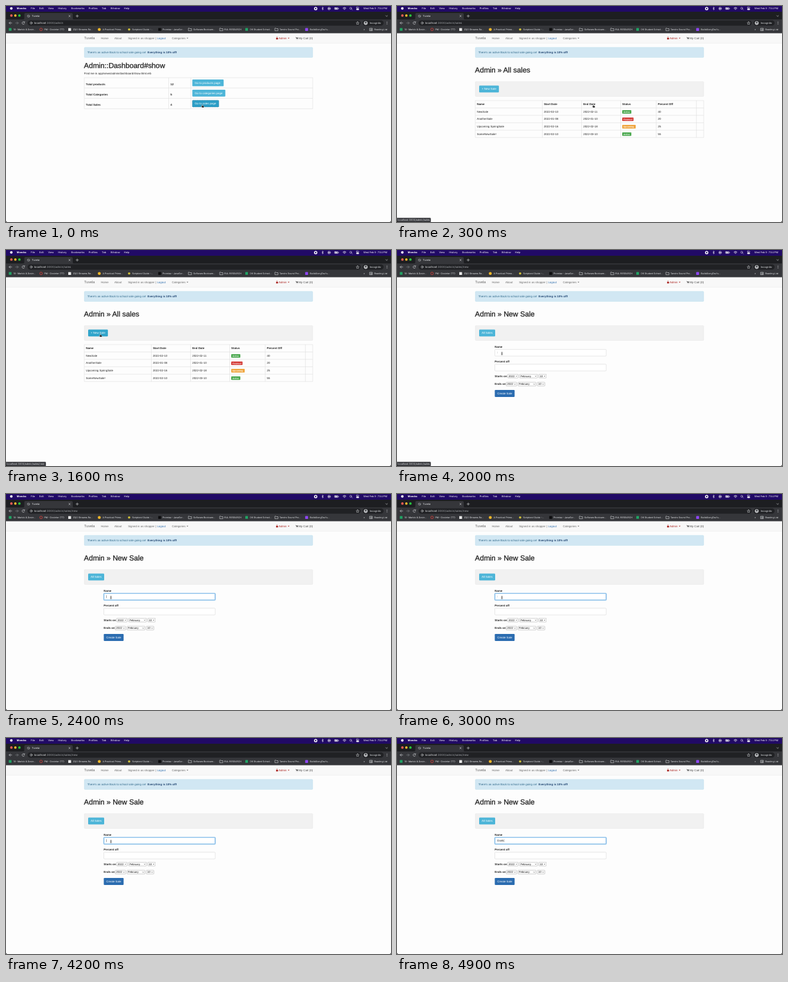
An HTML page for the animation above (5 s loop, 600 by 338 pixels).

```html
<!DOCTYPE html>
<html lang="en">
<head>
<meta charset="utf-8">
<title>Admin sales</title>
<style>
html, body { margin: 0; width: 100%; height: 100%; overflow: hidden; background: #fdfdfd; }
svg { display: block; width: 600px; height: 338px; }
text { text-rendering: geometricPrecision; white-space: pre; }
.ui { font-family: Inter, Roboto, sans-serif; fill: #e8eaed; }
.menu { font-size: 3.9px; fill: #fff; }
.marks { font-size: 3.55px; }
.url { font-size: 4.4px; }
.status text { font-size: 3.8px; }
.dim { fill: #a4a7ac; }
.page { font: 4.4px "Liberation Sans", Arial, sans-serif; fill: #222; }
.b { font-weight: 700; }
.nav { fill: #666; }
.brand { font-size: 5.62px; }
h1, .title { font-size: 11.3px; fill: #222; stroke: #222; stroke-width: .28px; }
.white { fill: #fff; }
.btn { fill: #4db5d8; }
.grid { fill: none; stroke: #d8d8d8; stroke-width: .5px; }
.well { fill: #f1f1f1; stroke: #e0e0e0; stroke-width: .4px; }
.field { fill: #fff; stroke: #c6c6c6; stroke-width: .4px; }
.badge { font-size: 3.28px; font-weight: 700; fill: #fff; }
.line { fill: none; stroke: #dcdee1; stroke-width: .6px; stroke-linecap: round; stroke-linejoin: round; }

.a { animation: 5s step-end infinite; }
.dash { animation-name: dash; }
.list { animation-name: list; }
.form { animation-name: form; }
.link { animation-name: link; }
.link-new { animation-name: link-new; }
.hover { animation-name: hover; }
.hand { animation-name: hand; }
.arrow { animation-name: arrow; }
.beam { animation-name: beam; }
.type { animation-name: type; }
.blink { animation-name: blink; }
.ring { animation-name: ring; animation-timing-function: linear; }
.move { animation-name: move; animation-timing-function: ease-in-out; }

@keyframes dash { 0% { opacity: 1 } 4%, 100% { opacity: 0 } }
@keyframes list { 0% { opacity: 0 } 4% { opacity: 1 } 34%, 100% { opacity: 0 } }
@keyframes form { 0% { opacity: 0 } 34%, 100% { opacity: 1 } }
@keyframes link { 0% { opacity: 0 } 2% { opacity: 1 } 13% { opacity: 0 } 34% { opacity: 1 } 42%, 100% { opacity: 0 } }
@keyframes link-new { 0% { opacity: 0 } 27% { opacity: 1 } 34%, 100% { opacity: 0 } }
@keyframes hover { 0% { fill: #4db5d8 } 26% { fill: #31a5cb } 34%, 100% { fill: #4db5d8 } }
@keyframes hand { 0% { opacity: 1 } 13% { opacity: 0 } 26% { opacity: 1 } 35%, 100% { opacity: 0 } }
@keyframes arrow { 0% { opacity: 0 } 13% { opacity: 1 } 26% { opacity: 0 } 35% { opacity: 1 } 39%, 100% { opacity: 0 } }
@keyframes beam { 0% { opacity: 0 } 39% { opacity: 1 } 86%, 100% { opacity: 0 } }
@keyframes blink { 0% { opacity: 0 } 44% { opacity: 1 } 54% { opacity: 0 } 64% { opacity: 1 } 74% { opacity: 0 } 84%, 100% { opacity: 1 } }
@keyframes ring { 0%, 44% { opacity: 0 } 46%, 100% { opacity: 1 } }
@keyframes type {
  0% { transform: none }
  86% { transform: translateX(3.18px) }
  88% { transform: translateX(5.62px) }
  92% { transform: translateX(7.09px) }
  94% { transform: translateX(8.07px) }
  96%, 100% { transform: translateX(10.27px) }
}
@keyframes move {
  0%, 12% { transform: translate(306px, 154px) }
  22%, 24% { transform: translate(151px, 135px) }
  26%, 34% { transform: translate(147px, 131px) }
  39.5%, 100% { transform: translate(163.5px, 162px) }
}
</style>
</head>
<body>
<svg viewBox="0 0 600 338">
  <defs>
    <path id="folder" d="M0 -1.8h1.7l.7 .7h2.6v3.2h-5z" fill="none" stroke="#d5d7da" stroke-width=".6"/>
    <g id="date">
      <g fill="#fff" stroke="#777" stroke-width=".35">
        <rect x="172.5" y="194.4" width="16.5" height="5.8" rx=".8"/>
        <rect x="191" y="194.4" width="28" height="5.8" rx=".8"/>
        <rect x="221" y="194.4" width="11.8" height="5.8" rx=".8"/>
      </g>
      <g font-size="4.16" fill="#111">
        <text x="174" y="198.8">2022</text>
        <text x="192.4" y="198.8">February</text>
        <text x="222.5" y="198.8">10</text>
      </g>
      <path d="M185.1 196.8l1.1 1.1 1.1-1.1M215.1 196.8l1.1 1.1 1.1-1.1M228.9 196.8l1.1 1.1 1.1-1.1" fill="none" stroke="#222" stroke-width=".55"/>
    </g>
  </defs>

  <rect width="600" height="338" fill="#fdfdfd"/>

  <!-- Menu bar -->
  <rect width="600" height="9" fill="#210a66"/>
  <circle cx="8.3" cy="3.8" r="2" fill="#fff"/>
  <g class="ui menu">
    <text x="16.8" y="5.2" class="b">Mondra</text>
    <text x="38.5" y="5.2">File</text>
    <text x="51.8" y="5.2">Edit</text>
    <text x="65.4" y="5.2">View</text>
    <text x="81.3" y="5.2">History</text>
    <text x="101.6" y="5.2">Bookmarks</text>
    <text x="128.8" y="5.2">Profiles</text>
    <text x="149.3" y="5.2">Tab</text>
    <text x="162.8" y="5.2">Window</text>
    <text x="183.8" y="5.2">Help</text>
    <text x="594" y="5.2" text-anchor="end">Wed Feb 9  7:54 PM</text>
  </g>
  <circle cx="482.6" cy="4" r="2.6" fill="#fff"/>
  <rect x="481.6" y="3" width="2" height="2" fill="#210a66"/>
  <g class="line" style="stroke:#fff;stroke-width:.5px">
    <path d="M492.3 2.8l2.4 2.2-1.2 1.2v-4.6l1.2 1.2-2.4 2.2"/>
    <circle cx="503.6" cy="4" r="2.1"/><path d="M503 3l1.6 1-1.6 1z" fill="#fff"/>
    <rect x="512" y="2.5" width="5.6" height="3" rx=".8"/><path d="M513 4h3.2" stroke-width="1.6"/><path d="M518.5 3.6v.8"/>
    <path d="M525.1 3.1q2.4-2 4.8 0M526 4.2q1.5-1.3 3 0M527.2 5.4h.6" stroke-width=".7"/>
    <circle cx="537.2" cy="3.6" r="1.5"/><path d="M538.4 4.8l1.3 1.3"/>
    <rect x="546" y="1.9" width="4" height="1.6" rx=".8"/><rect x="546" y="4.5" width="4" height="1.6" rx=".8" fill="#fff"/>
  </g>

  <!-- Browser frame -->
  <rect y="9" width="600" height="12.5" fill="#1d1e21"/>
  <rect y="21" width="600" height="22" fill="#35363a"/>
  <path d="M26.5 21.2q2 0 2-2v-6.2q0-2 2-2h71.5q2 0 2 2v6.2q0 2 2 2z" fill="#35363a"/>
  <circle cx="8.4" cy="14.9" r="1.9" fill="#ff5f57"/>
  <circle cx="14.6" cy="14.9" r="1.9" fill="#febc2e"/>
  <circle cx="20.9" cy="14.9" r="1.9" fill="#28c840"/>
  <g class="line">
    <circle cx="35" cy="15.8" r="1.8" style="stroke:#a4a7ac"/><path d="M33.8 15.2l1.4 .4.8 1.4" style="stroke:#a4a7ac"/>
    <path d="M97.9 14.6l2.2 2.2M100.1 14.6l-2.2 2.2M109.1 15.7h3.8M111 13.8v3.8M591.8 15l1.4 1.4 1.4-1.4"/>
    <path d="M9 26.6h-4M6.8 24.7l-1.9 1.9 1.9 1.9"/>
    <path d="M15 26.6h4M17.2 24.7l1.9 1.9-1.9 1.9" style="stroke:#85888c"/>
    <path d="M28.8 25.6a2 2 0 1 0 .1 1.9M29 24.4v1.4h-1.4"/>
  </g>
  <rect x="33.5" y="22.4" width="519.5" height="8.4" rx="4.2" fill="#202124"/>
  <rect x="555.5" y="22.4" width="33" height="8.4" rx="4.2" fill="#202124"/>
  <circle cx="560.6" cy="26.6" r="2.9" fill="#e8eaed"/>
  <path d="M559 26.3h3.2l-.5-1.5h-2.2zM558.6 26.5h4" fill="#35363a" stroke="#35363a" stroke-width=".3"/>
  <g fill="none" stroke="#35363a" stroke-width=".4"><circle cx="559.7" cy="27.7" r=".6"/><circle cx="561.5" cy="27.7" r=".6"/></g>
  <g class="line" style="stroke-width:.5px">
    <circle cx="39.3" cy="26.6" r="1.7"/><path d="M39.3 26.5v.9M39.3 25.7v.01"/>
    <path d="M548 24.5l.7 1.5 1.6.2-1.2 1.1.3 1.6-1.4-.8-1.4.8.3-1.6-1.2-1.1 1.6-.2z"/>
    <path d="M593.8 24.9v.01M593.8 26.6v.01M593.8 28.3v.01" style="stroke-width:.9px"/>
  </g>
  <g class="ui">
    <text x="40.2" y="17.2" font-size="3.9">Tuvela</text>
    <text x="566.8" y="28" font-size="4">Incognito</text>
  </g>

  <!-- Bookmarks -->
  <rect x="4.4" y="34.6" width="4.2" height="4.2" rx=".5" fill="#20a464"/>
  <circle cx="54.6" cy="36.7" r="2" fill="none" stroke="#e0403a" stroke-width=".8"/>
  <rect x="97" y="34.6" width="4.4" height="4.4" fill="#e9e9e9"/>
  <circle cx="145.4" cy="36.7" r="2.3" fill="#f5b928"/>
  <circle cx="191.9" cy="36.7" r="1.8" fill="#d3c338"/>
  <rect x="237.3" y="34.5" width="4.4" height="4.4" fill="#0c0c0e"/>
  <use href="#folder" x="284.2" y="36.6"/>
  <use href="#folder" x="333" y="36.6"/>
  <rect x="372.9" y="34.6" width="4.2" height="4.2" rx=".5" fill="#20a464"/>
  <use href="#folder" x="419" y="36.6"/>
  <rect x="466.3" y="34.5" width="4.4" height="4.4" rx=".4" fill="#9146ff"/>
  <path class="line" d="M567 34.9h4v3.8h-4zM568.2 36.2h1.8M568.2 37.5h1.8"/>
  <g class="ui marks">
    <text x="11.6" y="38">10- Marlok &amp; Dovin...</text>
    <text x="59.5" y="38">PM - Dovinter (TT)</text>
    <text x="104.4" y="38">ZQO Streams Re...</text>
    <text x="150.4" y="38">A Practical Prime...</text>
    <text x="196.4" y="38">Scriptorel Guide -...</text>
    <text x="244" y="38">Promise - JavaScr...</text>
    <text x="292" y="38">Software Bootcam...</text>
    <text x="340.2" y="38">RUL RESEARCH</text>
    <text x="380" y="38">OK Student Sched...</text>
    <text x="426.2" y="38">Tandro Sound Pro...</text>
    <text x="473.6" y="38">BuildAlongTavi's...</text>
    <text x="557.2" y="38">»</text>
    <text x="574" y="38">Reading List</text>
  </g>

  <!-- Site header -->
  <rect y="42.6" width="600" height="15.4" fill="#f8f8f8"/>
  <path d="M0 58.2h600" stroke="#e4e4e4" stroke-width=".5"/>
  <g class="page nav">
    <text x="121.8" y="52.3" class="brand">Tuvela</text>
    <text x="148" y="52">Home</text>
    <text x="169" y="52">About</text>
    <text x="190.2" y="52">Signed in as shopper |</text>
    <text x="235.4" y="52" fill="#2a6cac">Logout</text>
    <text x="258.4" y="52">Categories</text>
    <path d="M281.5 49.8h2.6l-1.3 1.4z"/>
    <g fill="#a8201c">
      <rect x="420.9" y="50" width="3" height="2.2" rx=".3"/>
      <path d="M421.5 50.2v-.9a.9.9 0 0 1 1.8 0v.9" fill="none" stroke="#a8201c" stroke-width=".5"/>
      <text x="425" y="52">Admin</text>
      <path d="M439.2 49.8h2.6l-1.3 1.4z"/>
    </g>
    <g fill="#444">
      <path d="M451.2 48.8h.9l.3.6h3l-.5 1.7h-2.2zM452.5 51.5h.8v.7h-.8zM454.2 51.5h.8v.7h-.8z"/>
      <text x="456.2" y="52">My Cart (0)</text>
    </g>
  </g>
  <rect x="122" y="64.7" width="356" height="15.8" rx="1.2" fill="#d1e7f3" stroke="#b5dcea" stroke-width=".4"/>
  <g class="page" fill="#2b6587">
    <text x="126.7" y="74.2" fill="#2b6587">There's an active Back to school sale going on!</text>
    <text x="220.5" y="74.2" class="b" fill="#1f4470">Everything is 10% off!</text>
  </g>

  <!-- Dashboard -->
  <g class="a dash">
    <text class="ui url" x="43.8" y="28.1">localhost<tspan class="dim">:3000/admin</tspan></text>
    <g class="page">
      <text x="121.6" y="97.3" class="title">Admin::Dashboard#show</text>
      <text x="121.8" y="107.2">Find me in app/views/admin/dashboard/show.html.erb</text>
      <path class="grid" d="M122 112.2h356v48.6h-356zM122 128.3h356M122 144.5h356M253.5 112.2v48.6M288 112.2v48.6"/>
      <g class="b">
        <text x="124.6" y="123.9">Total products</text><text x="256.3" y="123.9">12</text>
        <text x="124.6" y="140.1">Total Categories</text><text x="256.3" y="140.1">5</text>
        <text x="124.6" y="156.4">Total Sales</text><text x="256.3" y="156.4">4</text>
      </g>
      <g class="btn">
        <rect x="290.4" y="114.9" width="48.8" height="10.7" rx="1.2"/>
        <rect x="290.4" y="131.1" width="51.4" height="10.7" rx="1.2"/>
        <rect x="290.4" y="147.4" width="41.3" height="10.7" rx="1.2" fill="#2b9dc5" stroke="#1c6f90" stroke-width=".5" stroke-dasharray="1 .6"/>
      </g>
      <g class="white">
        <text x="294.2" y="121.8">Go to products page</text>
        <text x="294.2" y="138">Go to categories page</text>
        <text x="294.2" y="154.3">Go to sales page</text>
      </g>
    </g>
  </g>

  <!-- All sales -->
  <g class="a list">
    <text class="ui url" x="43.8" y="28.1">localhost<tspan class="dim">:3000/admin/sales</tspan></text>
    <g class="page">
      <text x="121.6" y="103.5" class="title">Admin » All sales</text>
      <rect class="well" x="122" y="118.4" width="356" height="23" rx="1"/>
      <rect class="btn a hover" x="128" y="124.5" width="30.8" height="10.8" rx="1.2"/>
      <text x="132" y="131.4" class="white">+ New Sale</text>
      <path class="grid" d="M122 148h356v57.8h-356zM122 159.6h356M122 171.1h356M122 182.7h356M122 194.3h356M226.5 148v57.8M287.6 148v57.8M348.6 148v57.8M404 148v57.8M466.6 148v57.8"/>
      <g class="b">
        <text x="124.5" y="155.3">Name</text><text x="228.9" y="155.3">Start Date</text><text x="290.2" y="155.3">End Date</text>
        <text x="351" y="155.3">Status</text><text x="406.5" y="155.3">Percent Off</text>
      </g>
      <text x="124.5" y="166.9">NewSale</text><text x="228.9" y="166.9">2022-02-10</text><text x="290.2" y="166.9">2022-02-11</text><text x="406.5" y="166.9">40</text>
      <text x="124.5" y="178.4">AnotherSale</text><text x="228.9" y="178.4">2022-01-08</text><text x="290.2" y="178.4">2022-01-10</text><text x="406.5" y="178.4">20</text>
      <text x="124.5" y="190">Upcoming SpringSale</text><text x="228.9" y="190">2022-02-16</text><text x="290.2" y="190">2022-02-18</text><text x="406.5" y="190">25</text>
      <text x="124.5" y="201.6">SomeNewSale!</text><text x="228.9" y="201.6">2022-02-10</text><text x="290.2" y="201.6">2022-03-10</text><text x="406.5" y="201.6">55</text>
      <rect x="351" y="163" width="14.2" height="5.6" rx=".8" fill="#4aa84e"/>
      <rect x="351" y="174.5" width="17.6" height="5.6" rx=".8" fill="#d43a36"/>
      <rect x="351" y="186.1" width="21" height="5.6" rx=".8" fill="#efa640"/>
      <rect x="351" y="197.7" width="14.2" height="5.6" rx=".8" fill="#4aa84e"/>
      <g class="badge">
        <text x="353" y="167">Active</text><text x="353" y="178.5">Finished</text>
        <text x="353" y="190.1">Upcoming</text><text x="353" y="201.7">Active</text>
      </g>
    </g>
  </g>

  <!-- New sale -->
  <g class="a form">
    <text class="ui url" x="43.8" y="28.1">localhost<tspan class="dim">:3000/admin/sales/new</tspan></text>
    <g class="page">
      <text x="121.6" y="103.5" class="title">Admin » New Sale</text>
      <rect class="well" x="122" y="118.4" width="356" height="23" rx="1"/>
      <rect class="btn" x="128" y="124.5" width="25" height="10.8" rx="1.2"/>
      <text x="131.9" y="131.4" class="white">All Sales</text>
      <g class="b">
        <text x="152.3" y="152.5">Name</text>
        <text x="152.3" y="175.5">Percent off</text>
        <text x="152.3" y="198.8">Starts on</text>
        <text x="152.3" y="211.4">Ends on</text>
      </g>
      <rect class="field" x="152.5" y="155.5" width="173.5" height="10.5" rx="1.1"/>
      <rect class="field" x="152.5" y="178.7" width="173.5" height="10.5" rx="1.1"/>
      <g class="a ring" fill="none" stroke="#66afe9">
        <rect x="152.5" y="155.5" width="173.5" height="10.5" rx="1.1" stroke-width="2.2" stroke-opacity=".28"/>
        <rect x="152.5" y="155.5" width="173.5" height="10.5" rx="1.1" stroke-width="1.2" stroke-opacity=".35"/>
        <rect x="152.5" y="155.5" width="173.5" height="10.5" rx="1.1" stroke-width=".5"/>
      </g>
      <text x="156.3" y="162.4">Dorik</text>
      <g class="a type">
        <rect x="156.3" y="157.5" width="14" height="6.5" fill="#fff"/>
        <path class="a blink" d="M156.7 158.3v4.8" stroke="#222" stroke-width=".4"/>
      </g>
      <use href="#date"/>
      <use href="#date" x="-2.4" y="12.6"/>
      <rect x="152.4" y="219.1" width="30.9" height="10.8" rx="1.2" fill="#2b6cb0"/>
      <text x="156.2" y="226.1" class="white">Create Sale</text>
    </g>
  </g>

  <!-- Link previews -->
  <g class="ui status">
    <g class="a link">
      <path d="M0 331.5h51.5q1.2 0 1.2 1.2v5.3h-52.7z" fill="#38393d"/>
      <text x="1.3" y="336.1">localhost:3000/admin/sales</text>
    </g>
    <g class="a link-new">
      <path d="M0 331.5h61q1.2 0 1.2 1.2v5.3h-62.2z" fill="#38393d"/>
      <text x="1.3" y="336.1">localhost:3000/admin/sales/new</text>
    </g>
  </g>
  <path d="M0 335.8q0 2.2 2.2 2.2h-2.2zM600 335.8q0 2.2-2.2 2.2h2.2z" fill="#111"/>

  <!-- Pointer -->
  <g class="a move">
    <path class="a hand" d="M-.5 .4q.5-.7 1 0v1.7l1.5.4q.7.2.6 1l-.3 1.4h-2.7l-1.6-2q.2-.7.9-.2l.6.4z" fill="#111" stroke="#fff" stroke-width=".4"/>
    <path class="a arrow" d="M0 0v4.4l1-.9.7 1.6.8-.3-.7-1.6h1.4z" fill="#111" stroke="#fff" stroke-width=".4"/>
    <path class="a beam" d="M-.9 -2.2q.9 0 .9.6v3.2q0 .6-.9.6M.9 -2.2q-.9 0-.9.6v3.2q0 .6.9.6M-.5 .7h1" fill="none" stroke="#111" stroke-width=".5"/>
  </g>
</svg>
</body>
</html>
```
